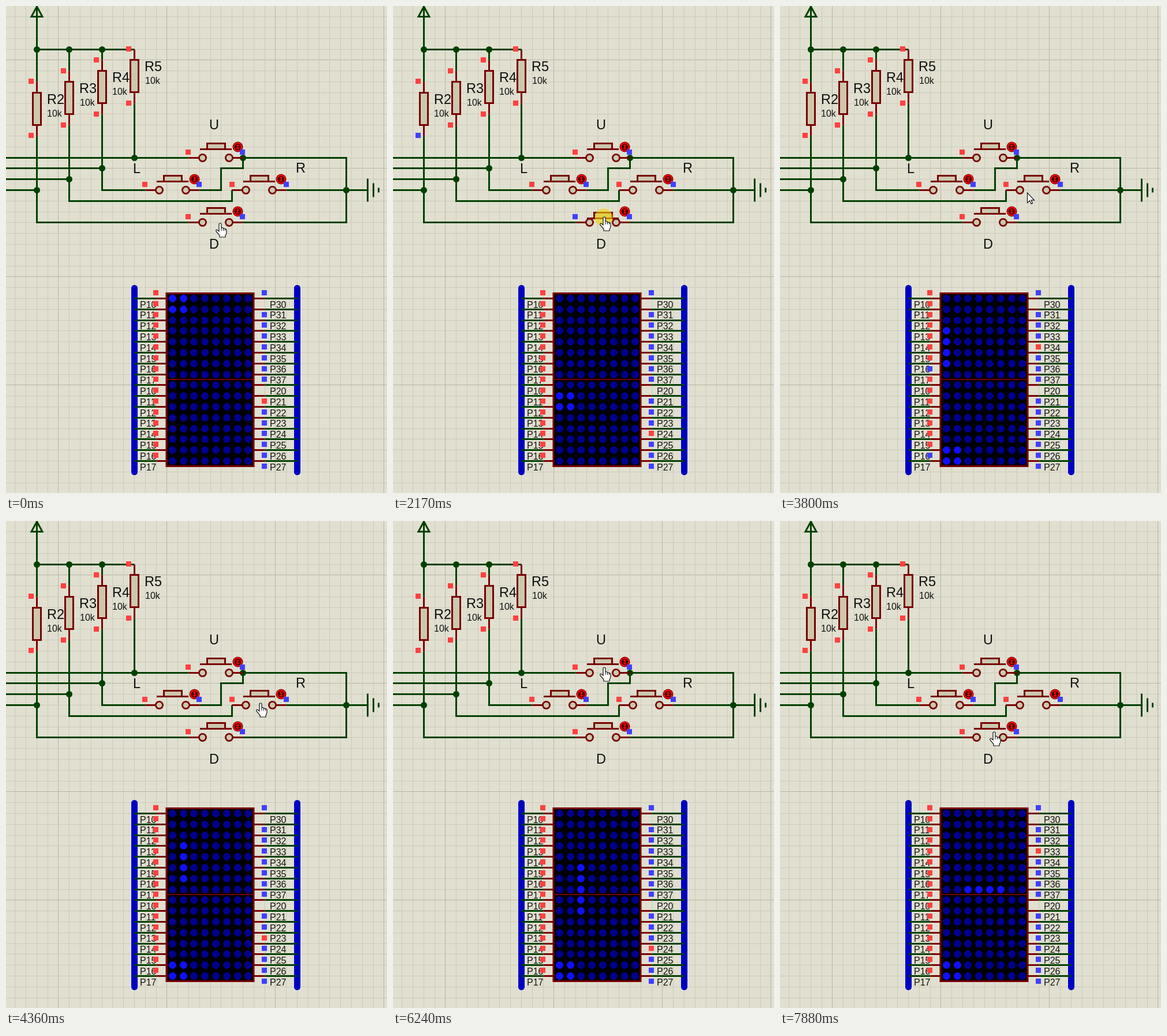
Recreate the animation shown at these times as an HTML page with a canvas. Size 660 px wide and 845 px high, loop 8000 ms.

```html
<!DOCTYPE html>
<html>
<head>
<meta charset="utf-8">
<style>
html, body { margin: 0; height: 100%; overflow: hidden; background: #e0dfd0; }
canvas { display: block; }
</style>
</head>
<body>
<canvas id="stage" width="660" height="845"></canvas>
<script>
const ctx = document.getElementById('stage').getContext('2d');
const GREEN = '#004000', MAROON = '#780000', BEIGE = '#cbc8ae', RED = '#ff4040', BLUE = '#4040ff';
const LOOP = 8000, TICK = 110.7;

// The schematic sits on a grid; X and Y turn grid units into pixel centres
const gx = i => 53.3 + 18.8 * i, gy = j => 75.1 + 18.8 * j;
const X = i => Math.floor(gx(i)) + .5, Y = j => Math.floor(gy(j)) + .5;

// name: grid place of the button, pixel place of its label
const BUTTONS = {
  D: { i: 16.5, j: 16, label: [352, 421] },
  R: { i: 20.5, j: 13, label: [502, 289] },
  L: { i: 12.5, j: 13, label: [220, 290] },
  U: { i: 16.5, j: 10, label: [352, 214] }
};
// button, tick pressed, tick released, tick its line goes high again
const PRESSES = [['D', 8, 26, 27], ['R', 35, 38, 39], ['R', 43, 46, 47], ['U', 57, 60, 64]];
// tick, x, y, arrow pointer
const POINTER = [[0, 371, 377], [4, 371, 377], [7, 366, 366], [29, 366, 366, 1], [35, 441, 316], [49, 441, 316, 1],
  [54, 366, 254], [60, 366, 254, 1], [63, 425, 330, 1], [68, 371, 366], [72, 371, 366]];
// tick, rows scanned so far
const SCAN = [[0, 9], [27, 150], [39, 203], [48, 241], [63, 322], [71, 355], [72, 360]];

const HAND = new Path2D('M-2 14V2Q-2 0 0 0Q2 0 2 2V9Q2 7 4 7.5Q5.5 8 5.5 10Q7 8 8.5 10Q10.5 9.5 11 12V16Q11 19 9 21V24H-1V21L-7 14Q-8 11 -5 11.5Z');
const ARROW = new Path2D('M0 0V17L4 13.5L6.5 19L9 18L6.5 12.5H12Z');
const UPDOWN = new Path2D('M0-5L3.5-1.5H1.2V1.5H3.5L0 5L-3.5 1.5H-1.2V-1.5H-3.5Z');

const keyAt = (keys, n) => keys.findLastIndex(k => k[0] <= n);
function lerp(keys, n, field) {
  const i = keyAt(keys, n), a = keys[i], b = keys[i + 1];
  return a[field] + (b[field] - a[field]) * (n - a[0]) / (b[0] - a[0]);
}

function line(color, width, ...p) {
  ctx.strokeStyle = color;
  ctx.lineWidth = width;
  ctx.beginPath();
  for (let i = 0; i < p.length; i += 2) ctx.lineTo(p[i], p[i + 1]);
  ctx.stroke();
}
const onGrid = p => p.map((v, k) => k % 2 ? Y(v) : X(v));
const wire = (...p) => line(GREEN, 3, ...onGrid(p));
const pin = (...p) => line(MAROON, 3, ...onGrid(p));

function disc(x, y, r, fill) {
  ctx.fillStyle = fill;
  ctx.beginPath();
  ctx.arc(x, y, r, 0, 7);
  ctx.fill();
}
const dot = (i, j) => disc(X(i), Y(j), 5.5, GREEN);

function box(x, y, w, h, fill) {
  ctx.fillStyle = fill;
  ctx.fillRect(x, y, w, h);
  ctx.strokeStyle = MAROON;
  ctx.lineWidth = 3;
  ctx.strokeRect(x, y, w, h);
}
function square(i, j, color) {
  ctx.fillStyle = color;
  ctx.fillRect(Math.round(gx(i) - 5.05), Math.round(gy(j) - 5.05), 9, 9);
}
function text(s, x, y, size) {
  ctx.fillStyle = '#111';
  ctx.font = size + 'px "Liberation Sans", Arial, sans-serif';
  ctx.fillText(s, Math.floor(x), Math.floor(y));
}

function drawGrid() {
  ctx.fillStyle = '#e0dfd0';
  ctx.fillRect(0, 0, 660, 845);
  for (let k = -4; k < 42; k++) {
    line((k + 8) % 10 ? '#cdccbb' : '#b7b6a3', 1, X(k), 0, X(k), 845);
    line((k + 9) % 10 ? '#cdccbb' : '#b7b6a3', 1, 0, Y(k), 660, Y(k));
  }
}

function drawWires() {
  const left = -3;
  wire(0, -4, 0, 3);
  line(GREEN, 3, 53.5, 1, 44, 18.5, 63, 18.5, 53.5, 1);
  wire(0, 0, 9, 0);
  wire(0, 8, 0, 16, 14, 16);
  wire(3, 0, 3, 2);
  wire(3, 7, 3, 14, 18, 14, 18, 13);
  wire(6, 0, 6, 1);
  wire(6, 6, 6, 13, 10, 13);
  wire(9, 5, 9, 10, 14, 10);
  for (let k = 0; k < 4; k++) {
    wire(left, 13 - k, 3 * k, 13 - k);
    dot(3 * k, 13 - k);
    if (k < 3) dot(3 * k, 0);
  }
  wire(19, 10, 28.5, 10, 28.5, 16, 19, 16);
  wire(19, 10, 19, 11, 17, 11, 17, 13, 15, 13);
  wire(23, 13, 30.5, 13);
  dot(19, 10);
  dot(28.5, 13);
  for (let k = 0; k < 3; k++) {
    const x = X(30.5 + k / 2), h = 20 - 8 * k;
    line(GREEN, 3, x, 319.5 - h, x, 319.5 + h);
  }
}

function drawResistors(low) {
  ['D', 'R', 'L', 'U'].forEach((name, k) => {
    const i = 3 * k, x = X(i), y = Y(4 - k);
    pin(i, 3 - k, i, 8 - k);
    box(x - 7, y, 14, 56, BEIGE);
    text('R' + (k + 2), gx(i) + 18, gy(4 - k) + 20, 23.5);
    text('10k', gx(i) + 18.5, gy(4 - k) + 42, 16);
    square(i - .5, 3 - k, RED);
    square(i - .5, 8 - k, low[name] ? BLUE : RED);
  });
}

function drawButton(name, down, low) {
  const { i, j, label } = BUTTONS[name], x = X(i), y = Y(j), dy = down ? 8 : 0;
  for (const s of [-1, 1]) {
    pin(i + s * 1.5, j, i + s * 2.5, j);
    disc(x + s * 23, y, 7.5, MAROON);
    disc(x + s * 23, y, 4.7, BEIGE);
  }
  line(MAROON, 3, x - 27.5, y - 15 + dy, x + 27.5, y - 15 + dy);
  box(x - 15, y - 25 + dy, 31, 10, BEIGE);
  ctx.save();
  ctx.translate(x + 38, y - 19);
  disc(0, 0, 9, '#5a0000');
  disc(0, 0, 8.2, '#f00000');
  disc(0, 0, 5.5, '#300000');
  ctx.fillStyle = '#f00000';
  ctx.fill(UPDOWN);
  ctx.restore();
  square(i - 2.5, j - .5, low ? BLUE : RED);
  square(i + 2.5, j - .5, BLUE);
  text(name, ...label, 23.5);
}

function litCells(n) {
  const cells = new Set();
  const fill = (row, col, h, w) => {
    for (let r = 0; r < h; r++) for (let c = 0; c < w; c++) cells.add((row + r) * 8 + col + c);
  };
  // the block falls slowly, then fast while D is held
  fill(n < 1 ? 0 : n < 8 ? 1 : Math.min(14, 5 + Math.floor((n - 12) * 9 / 13)), 0, 2, 2);
  if (n >= 25) {
    const top = n < 32 ? Math.floor((n - 23) / 3) : Math.floor(n / 8) - 1;
    const col = n < 37 ? 0 : n < 45 ? 1 : 2;
    const trail = n % 8 ? 0 : 1; // the row just left still glows
    if (n >= 59) fill(top, 2, 1, 4);
    else fill(top - trail, col, 4 + trail, 1);
  }
  return cells;
}

function drawMatrix(n) {
  const lit = litCells(n), scan = Math.floor(lerp(SCAN, n, 1)) % 16;
  ctx.lineCap = 'round';
  line('#0000c0', 11, X(9), 489.5, X(9), 808.5);
  line('#0000c0', 11, X(24), 489.5, X(24), 808.5);
  ctx.lineCap = 'butt';
  for (let r = 0; r < 16; r++) {
    const j = 23 + r, base = 524 + 18.8 * r;
    wire(9, j, 11, j);
    pin(11, j, 12, j);
    pin(20, j, 21, j);
    wire(21, j, 24, j);
    text('P1' + r % 8, 232, base, 16);
    text('P' + (r < 8 ? 3 : 2) + r % 8, 457, base, 16);
  }
  box(X(12) - .5, Y(22.5), 151, 300, '#000');
  for (let k = 0; k < 128; k++)
    disc(X(12.5 + k % 8), Y(23 + (k >> 3)), 6.5, lit.has(k) ? '#1010ff' : '#000090');
  line(MAROON, 2, X(12), 648, X(20), 648);

  // the first row of each half carries its marker above the pin, the rest below
  for (let r = 0; r < 16; r++) {
    square(11, 22.5 + r, lit.has(scan * 8 + 7 - r % 8) ? BLUE : RED);
    square(21, 23 + r + (r % 8 ? .5 : -.5), r === scan ? RED : BLUE);
  }
}

function drawPointer(n, pressed) {
  const x = lerp(POINTER, n, 1), y = lerp(POINTER, n, 2);
  const arrow = POINTER[keyAt(POINTER, n)][3], shape = arrow ? ARROW : HAND;
  if (pressed) disc(x - 1, y + 1, 15.5, 'rgba(240,215,0,.6)');
  ctx.save();
  ctx.translate(x, y);
  ctx.fillStyle = '#fff';
  ctx.fill(shape);
  ctx.strokeStyle = '#111';
  ctx.lineWidth = 1.2;
  ctx.stroke(shape);
  if (!arrow) for (const k of [2, 5.5, 8.5]) line('#111', 1, k, 9, k, 13);
  ctx.restore();
}

function draw(n) {
  const down = {}, low = {};
  for (const [name, from, to, high] of PRESSES) {
    if (n >= from && n < to) down[name] = true;
    if (n > from && n < high) low[name] = true;
  }
  drawGrid();
  drawWires();
  drawResistors(low);
  for (const name in BUTTONS) drawButton(name, down[name], low[name]);
  drawMatrix(n);
  drawPointer(n, Object.keys(down).length);
}

const start = performance.now();
function frame() {
  const t = (performance.now() - start) % LOOP;
  draw(Math.min(71, Math.floor(t / TICK + .2)));
  requestAnimationFrame(frame);
}
frame();
</script>
</body>
</html>
```
